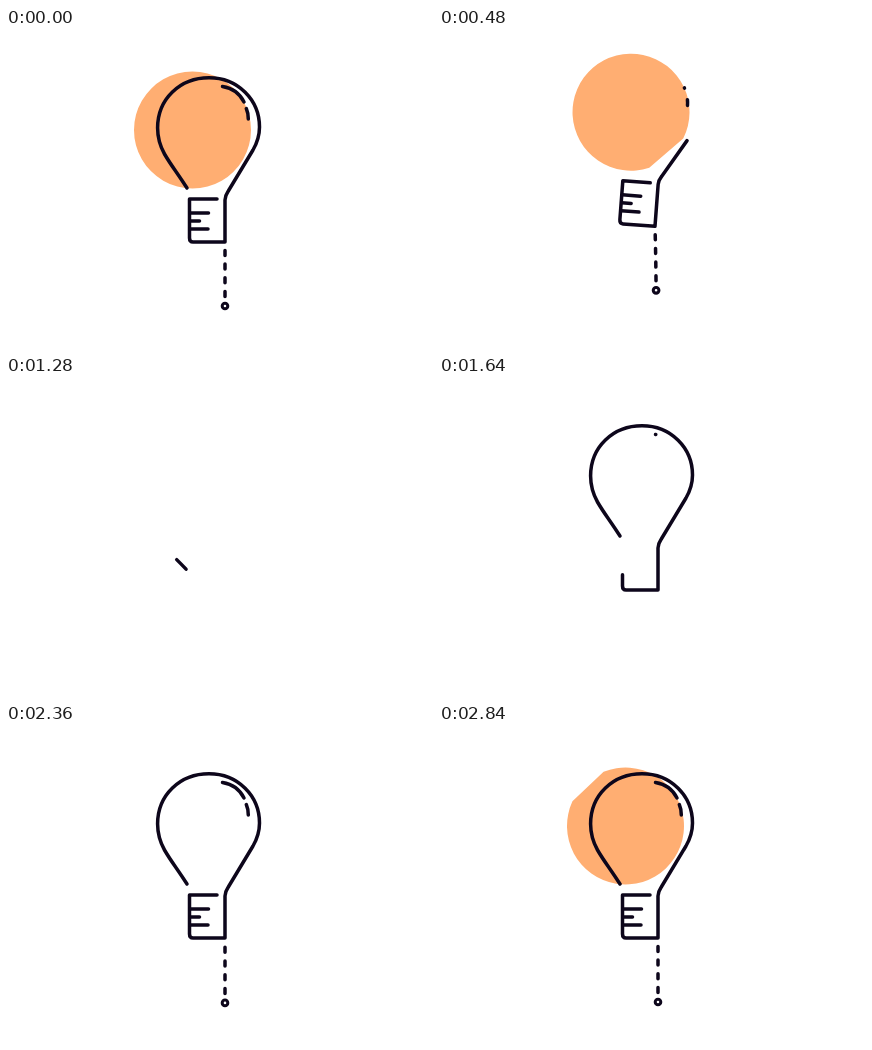
These frames come from a looping animation (427 px wide and 320 px high, 2.88 s). An HTML page:

```html
<!DOCTYPE html>
<html lang="en">
<head>
<meta charset="utf-8">
<title>Light bulb loop</title>
<style>
  html, body { margin: 0; width: 100%; height: 100%; overflow: hidden; background: #fff; }
  svg { display: block; width: 100vw; height: 100vh; }
  .ink { fill: none; stroke: #0d061b; stroke-width: 3.500; stroke-linecap: round; stroke-linejoin: round; }
</style>
</head>
<body>
<svg viewBox="0 0 427 320">
  <g id="bulb">
    <path id="glow" fill="#ffae72"/>
    <path id="outline" class="ink" d="M181 160C170 143 165.500 138 158.500 126C153.500 117 151.600 109 151.600 100C151.600 71 174 49.800 203 49.800C232 49.800 253.500 72 253.500 99C253.500 108 251 115 247 122L222 163.500Q219 168 219 172V214H187Q183.500 214 183.500 210V171H211"/>
    <path id="shine1" class="ink" d="M216.500 58.500C226 60 234 66 238 74"/>
    <path id="shine2" class="ink" d="M240.300 80.500Q242.300 85 242.300 91"/>
    <path id="tick1" class="ink" d="M184 185H202.500"/>
    <path id="tick2" class="ink" d="M184 193H193.500"/>
    <path id="tick3" class="ink" d="M184 201H202"/>
  </g>
  <path id="cord" class="ink"/>
  <circle id="ball" class="ink" r="2.800" style="fill:#fff;stroke-width:3"/>
</svg>
<script>
const LOOP = 2880, EXIT_END = 960;
const PIVOT = [183, 171], HOOK = [36, 43];
const GLOW = { x: 186.5, y: 102, r: 58.5 };
const CORD = 64, DASH = 5, STEP = 13.7, LAST = 12;

const el = {};
document.querySelectorAll('[id]').forEach(n => el[n.id] = n);

// Progress from 0 to 1 between two times, eased in and out by a power.
function ease(t, start, end, power = 3) {
  const u = Math.min(1, Math.max(0, (t - start) / (end - start)));
  return u < 0.5 ? Math.pow(2 * u, power) / 2 : 1 - Math.pow(2 - 2 * u, power) / 2;
}

const bump = (t, start, peak, end) =>
  t < peak ? ease(t, start, peak, 2) : 1 - ease(t, peak, end, 2);

function trim(path, from, to) {
  const len = path.getTotalLength(), part = (to - from) * len;
  path.style.display = part < 0.3 ? 'none' : '';
  path.setAttribute('stroke-dasharray', `${part} ${len * 2}`);
  path.setAttribute('stroke-dashoffset', -from * len);
}

// Slice of the disc, growing along the diagonal from the given side.
function drawGlow(part, side) {
  const half = Math.min(Math.acos(1 - 2 * part), Math.PI - 0.001);
  const at = a => `${GLOW.x + GLOW.r * Math.cos(a)} ${GLOW.y + GLOW.r * Math.sin(a)}`;
  const large = half > Math.PI / 2 ? 1 : 0;
  el.glow.style.display = part <= 0 ? 'none' : '';
  el.glow.setAttribute('d',
    `M${at(side - half)}A${GLOW.r} ${GLOW.r} 0 ${large} 1 ${at(side + half)}Z`);
}

// Dashes are spaced from the ball upwards, so a pull feeds out more of them.
function drawCord(hook, length, bend, tip, from, to, scale) {
  const point = s => {
    const u = s / length, v = 1 - u;
    return `${hook[0] + 2 * u * v * bend + u * u * tip} ${hook[1] + s}`;
  };
  let d = '';
  for (let mid = length - LAST; mid > 0; mid -= STEP) {
    const a = Math.max(mid - DASH / 2, from * length, 0);
    const b = Math.min(mid + DASH / 2, to * length);
    if (b > a) d += `M${point(a)}L${point(b)}`;
  }
  el.cord.setAttribute('d', d);
  el.ball.style.display = scale < 0.02 ? 'none' : '';
  el.ball.setAttribute('transform',
    `translate(${hook[0] + tip} ${hook[1] + length}) scale(${scale})`);
}

function placeBulb(angle, dx, dy) {
  el.bulb.setAttribute('transform', `translate(${dx} ${dy}) rotate(${angle} ${PIVOT})`);
  const a = angle * Math.PI / 180, c = Math.cos(a), s = Math.sin(a);
  return [
    PIVOT[0] + dx + HOOK[0] * c - HOOK[1] * s,
    PIVOT[1] + dy + HOOK[0] * s + HOOK[1] * c
  ];
}

function leave(t) {
  const turn = ease(t, 200, 920);
  const hook = placeBulb(18.4 * turn, 1.4 * turn, -42 * ease(t, 172, 817));
  const out = (name, a, b, power) => trim(el[name], ease(t, a, b, power), 1);
  drawGlow(1 - ease(t, 416, 718), Math.PI * 1.25);
  out('outline', 15, 916, 4);
  out('shine1', 240, 520);
  out('shine2', 360, 600);
  out('tick1', 560, 800, 2);
  out('tick2', 540, 780, 2);
  out('tick3', 480, 740, 2);
  const sway = turn / 0.765;
  const scale = (1 + 0.18 * bump(t, 440, 640, 760)) * (1 - ease(t, 680, 840));
  drawCord(hook, CORD, 3 * sway, 3.6 * sway, ease(t, 490, 810, 2), 1, scale);
}

function enter(t) {
  const away = 1 - ease(t, 1100, 1570);
  const hook = placeBulb(-14 * away, 1.4 * away, 42 * away);
  const draw = (name, a, b, power) => trim(el[name], 0, ease(t, a, b, power));
  drawGlow(ease(t, 2446, 2900, 2), Math.PI * 0.258);
  draw('outline', 1060, 1955, 4);
  draw('shine1', 1600, 1880);
  draw('shine2', 1760, 1960);
  draw('tick1', 1880, 2130, 2);
  draw('tick2', 1840, 2090, 2);
  draw('tick3', 1760, 1990, 2);
  const sway = bump(t, 1820, 2040, 2260);
  const length = CORD - sway + 22 * bump(t, 2320, 2600, 2800);
  drawCord(hook, length, sway, 8.5 * sway, 0, ease(t, 1680, 1980, 2), ease(t, 1840, 2000));
}

function render(t) {
  if (t < EXIT_END) leave(t);
  else enter(t);
}

let begin;
function tick(now) {
  begin ??= now;
  render((now - begin) % LOOP);
  requestAnimationFrame(tick);
}
render(0);
requestAnimationFrame(tick);
</script>
</body>
</html>
```
